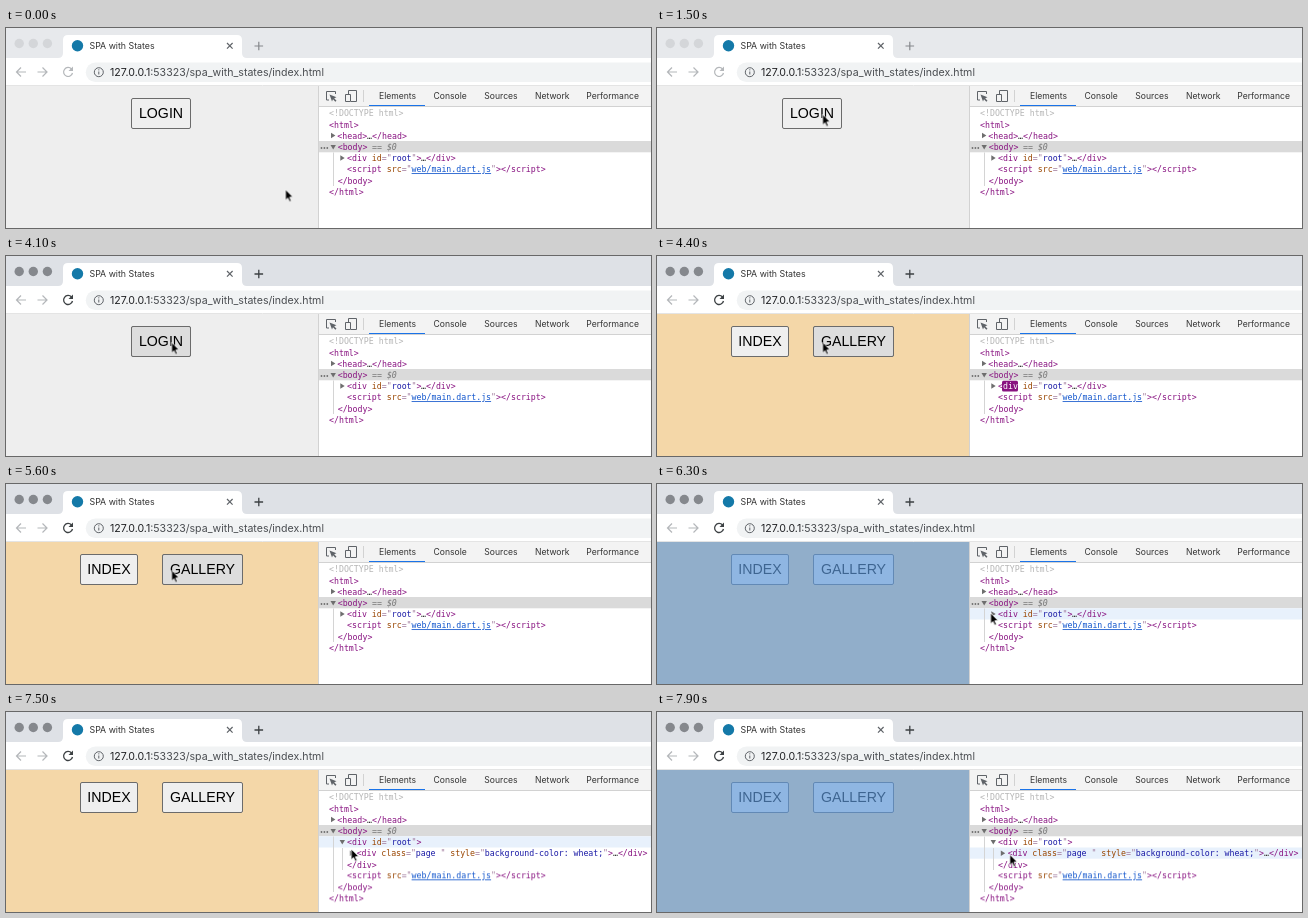
An HTML page that plays this animation: 645x200 px, repeating every 8000 ms.

```html
<!DOCTYPE html>
<html lang="en">
<head>
<meta charset="utf-8">
<title>SPA with States</title>
<style>
html, body { margin: 0; width: 100%; height: 100%; overflow: hidden; background: #fff; }
svg { display: block; width: 645px; height: 200px; }
text { white-space: pre; }

.ui { font-family: Inter, Roboto, sans-serif; fill: #333; }
.tabs { font-size: 8.6px; }
.button text { font: 14.2px "Liberation Sans", Arial, sans-serif; text-anchor: middle; }
.button rect { fill: #efefef; stroke: #6b6b6b; }
.code { font: 8.25px "DejaVu Sans Mono", "Liberation Mono", monospace; fill: #333; }
.tag { fill: #881280; }
.mark { fill: #a07a9c; }
.attr { fill: #994500; }
.value { fill: #1a1aa6; }
.link { fill: #1155cc; text-decoration: underline; }
.faint { fill: #b5b5b5; }
.arrow { fill: #6e6e6e; }
.guide { stroke: #d4d4d4; }
.row { fill: #e8f1fc; }
.line { fill: none; stroke: #5f6368; }
.pale { stroke: #b4b7ba; }

/* Hard state changes */
.step { animation: 8s step-end infinite; }
.inactive { animation-name: inactive; }
.active { animation-name: active; }
.login { animation-name: login; }
.member { animation-name: member; }
.hover { fill: #ddd !important; }
.hover-login { animation-name: active; }
.hover-gallery { animation-name: hover-gallery; }
.overlay { fill: rgba(95, 154, 221, .66); animation-name: overlay; }
.hover-root { animation-name: hover-root; }
.hover-page { animation-name: hover-page; }
.closed { animation-name: closed; }
.opened { animation-name: opened; }
.pushed { animation-name: pushed; }
.flash { animation: flash 8s linear infinite; }
.cursor { animation: cursor 8s infinite; }

@keyframes inactive { 0% { opacity: 1 } 45%, 100% { opacity: 0 } }
@keyframes active { 0% { opacity: 0 } 45%, 100% { opacity: 1 } }
@keyframes login { 0% { opacity: 1 } 53.75%, 100% { opacity: 0 } }
@keyframes member { 0% { opacity: 0 } 53.75%, 100% { opacity: 1 } }
@keyframes hover-gallery { 0% { opacity: 0 } 53.75% { opacity: 1 } 73.5%, 100% { opacity: 0 } }
@keyframes overlay { 0% { opacity: 0 } 76.9% { opacity: 1 } 84% { opacity: 0 } 94%, 100% { opacity: 1 } }
@keyframes hover-root { 0% { opacity: 0 } 76.9% { opacity: 1 } 94%, 100% { opacity: 0 } }
@keyframes hover-page { 0% { opacity: 0 } 94%, 100% { opacity: 1 } }
@keyframes closed { 0% { opacity: 1 } 87.5%, 100% { opacity: 0 } }
@keyframes opened { 0% { opacity: 0 } 87.5%, 100% { opacity: 1 } }
@keyframes pushed { 0% { transform: none } 87.5%, 100% { transform: translateY(22.3px) } }
@keyframes flash { 0%, 54.3% { opacity: 0 } 54.4%, 55.5% { opacity: 1 } 67%, 100% { opacity: 0 } }
@keyframes cursor {
  0%, 1.25% { transform: translate(279.5px, 161.5px); animation-timing-function: ease-out }
  16%, 71.25% { transform: translate(165.6px, 86.3px); animation-timing-function: ease-in-out }
  78% { transform: translate(333.5px, 129px) }
  84%, 91% { transform: translate(334.3px, 129px); animation-timing-function: ease-in-out }
  96%, 100% { transform: translate(352.8px, 142.500px) }
}
</style>
</head>
<body>
<svg viewBox="0 0 645 200" xml:space="preserve">
  <defs>
    <path id="right" class="arrow" d="M-2-2.7 2.4 0-2 2.7z"/>
    <path id="down" class="arrow" d="M-2.7-2H2.700L0 2.4z"/>
    <g id="lights"><circle cx="13.2" cy="15.5" r="4.7"/><circle cx="27.3" cy="15.5" r="4.7"/><circle cx="41.4" cy="15.5" r="4.7"/></g>
    <path id="plus" d="M248.5 18h8.6M252.8 13.7v8.6"/>
    <g id="reload">
      <path d="M65.5 41A4.5 4.5 0 1 0 66.5 45" fill="none"/>
      <path d="M67 38.5V43H62.5z" stroke="none"/>
    </g>
  </defs>

  <!-- Browser frame -->
  <rect width="645" height="31" fill="#dee1e6"/>
  <use href="#lights" fill="#85888d"/>
  <g class="step inactive">
    <rect width="645" height="31" fill="#e7e9ec"/>
    <use href="#lights" fill="#d4d6d9"/>
  </g>
  <path d="M0 57V30H52Q57 30 57 25V12Q57 7 62 7H231Q236 7 236 12V25Q236 30 241 30H645V57z" fill="#fff"/>
  <circle cx="71.5" cy="17.8" r="5.7" fill="#1479a8"/>
  <text class="ui" x="83.5" y="21" font-size="8.8">SPA with States</text>
  <g class="line" stroke-width="1.2">
    <path d="M221 15l5.6 5.6M226.6 15l-5.6 5.6"/>
    <path class="pale" d="M20 44H10.5M15 39.5 10.5 44 15 48.5M31.5 44H41M36.5 39.5 41 44 36.5 48.5"/>
  </g>
  <g class="step inactive" stroke="#85888c" stroke-width="1.2">
    <use href="#plus"/>
    <use href="#reload" stroke="#b4b7ba" fill="#b4b7ba"/>
  </g>
  <g class="step active" stroke="#3c4043" stroke-width="1.3">
    <use href="#plus"/>
    <use href="#reload" fill="#3c4043"/>
  </g>
  <path d="M645 34.5H89.5A9.7 9.7 0 0 0 89.5 54H645z" fill="#f1f3f4"/>
  <g class="line">
    <circle cx="92.8" cy="44.2" r="4.5"/>
    <path d="M92.8 43.5v3M92.8 41.3v1.1"/>
  </g>
  <text class="ui" x="104" y="47.8" font-size="10.6" style="fill:#4a4d51"><tspan fill="#202124">127.0.0.1</tspan>:53323/spa_with_states/index.html</text>
  <path d="M0 57.5H645" stroke="#e4e4e4"/>

  <!-- Page -->
  <rect y="58" width="312" height="142" fill="#eee"/>
  <g class="button step login">
    <rect x="125.5" y="70.5" width="59" height="30" rx="1.5"/>
    <rect class="hover step hover-login" x="125.5" y="70.5" width="59" height="30" rx="1.5"/>
    <text x="155" y="90.2">LOGIN</text>
  </g>
  <g class="button step member">
    <rect y="58" width="312" height="142" style="fill:#f4d7a8;stroke:none"/>
    <rect x="74.5" y="70.5" width="57" height="30" rx="1.5"/>
    <text x="103" y="90.2">INDEX</text>
    <rect x="156.5" y="70.5" width="80" height="30" rx="1.5"/>
    <rect class="hover step hover-gallery" x="156.5" y="70.5" width="80" height="30" rx="1.5"/>
    <text x="196.5" y="90.2">GALLERY</text>
  </g>
  <rect class="step overlay" y="58" width="312" height="142"/>

  <!-- Inspector toolbar -->
  <rect x="312" y="58" width="333" height="142" fill="#fff"/>
  <rect x="312" y="58" width="333" height="20" fill="#f3f3f3"/>
  <path d="M312.5 58V200M312 78.5H645M357.5 62V74" stroke="#d2d2d2" fill="none"/>
  <g class="line">
    <path d="M323 72H320.5V63.5H329.5V66"/>
    <path d="M342.5 66V62.5H350.5V73.5H345M339.5 66.5H344.5V73.5H339.5z"/>
  </g>
  <path d="M323.5 66.5 330.5 69.2 328.2 70.2 330.5 72.7 329.3 73.8 327 71.3 326 73.6z" fill="#5f6368"/>
  <g class="ui tabs">
    <text x="373" y="71">Elements</text>
    <text x="427.5" y="71">Console</text>
    <text x="478.3" y="71">Sources</text>
    <text x="529" y="71">Network</text>
    <text x="580.3" y="71">Performance</text>
  </g>
  <rect x="363" y="77" width="56" height="1" fill="#1a73e8"/>

  <!-- Element tree -->
  <rect x="313" y="113" width="332" height="11.3" fill="#dadada"/>
  <rect class="row step hover-root" x="313" y="124.3" width="332" height="11.2"/>
  <rect class="row step hover-page" x="313" y="135.5" width="332" height="11.2"/>
  <path class="guide" d="M327.5 124.5V158"/>
  <path class="guide step opened" d="M327.5 158V180M336.5 136V158"/>
  <g fill="#6e6e6e"><circle cx="315.5" cy="120" r=".9"/><circle cx="318.4" cy="120" r=".9"/><circle cx="321.3" cy="120" r=".9"/></g>
  <use href="#right" x="327" y="107.5"/>
  <use href="#down" x="327.2" y="119"/>
  <g class="code">
    <text class="faint" x="323" y="88.3">&lt;!DOCTYPE html&gt;</text>
    <text class="tag" x="323" y="99.5">&lt;html&gt;</text>
    <text x="331.3" y="110.6"><tspan class="tag">&lt;head&gt;</tspan>…<tspan class="tag">&lt;/head&gt;</tspan></text>
    <text x="331.7" y="121.8"><tspan class="tag">&lt;body&gt;</tspan><tspan x="366" fill="#777" font-style="italic">== $0</tspan></text>
    <text class="tag" x="341" y="133">&lt;div <tspan class="attr">id</tspan><tspan class="mark">="</tspan><tspan class="value">root</tspan><tspan class="mark">"</tspan>&gt;</text>
    <g class="step closed">
      <use href="#right" x="336.3" y="130"/>
      <text x="415" y="133">…<tspan class="tag">&lt;/div&gt;</tspan></text>
    </g>
    <g class="flash">
      <rect x="345" y="124.8" width="16" height="10.8" rx="1.5" fill="#881280"/>
      <text x="346" y="133" fill="#fff">div</text>
    </g>
    <g class="step opened">
      <use href="#down" x="336.3" y="130"/>
      <use href="#right" x="345.8" y="141.3"/>
      <text class="tag" x="350.7" y="144.2" letter-spacing="-.04">&lt;div <tspan class="attr">class</tspan><tspan class="mark">="</tspan><tspan class="value">page </tspan><tspan class="mark">"</tspan> <tspan class="attr">style</tspan><tspan class="mark">="</tspan><tspan class="value">background-color: wheat;</tspan><tspan class="mark">"</tspan>&gt;<tspan fill="#333">…</tspan>&lt;/div&gt;</text>
      <text class="tag" x="341" y="155.5">&lt;/div&gt;</text>
    </g>
    <g class="step pushed">
      <text class="tag" x="341" y="144.2">&lt;script <tspan class="attr">src</tspan><tspan class="mark">="</tspan><tspan class="link">web/main.dart.js</tspan><tspan class="mark">"</tspan>&gt;&lt;/script&gt;</text>
      <text class="tag" x="331.7" y="155.5">&lt;/body&gt;</text>
      <text class="tag" x="323" y="166.7">&lt;/html&gt;</text>
    </g>
  </g>

  <path class="cursor" d="M0 0V10.7L2.4 8.5 4 12.2 5.8 11.4 4.2 7.8 7.5 7.6z" stroke="#fff" stroke-width=".8"/>
</svg>
</body>
</html>
```
